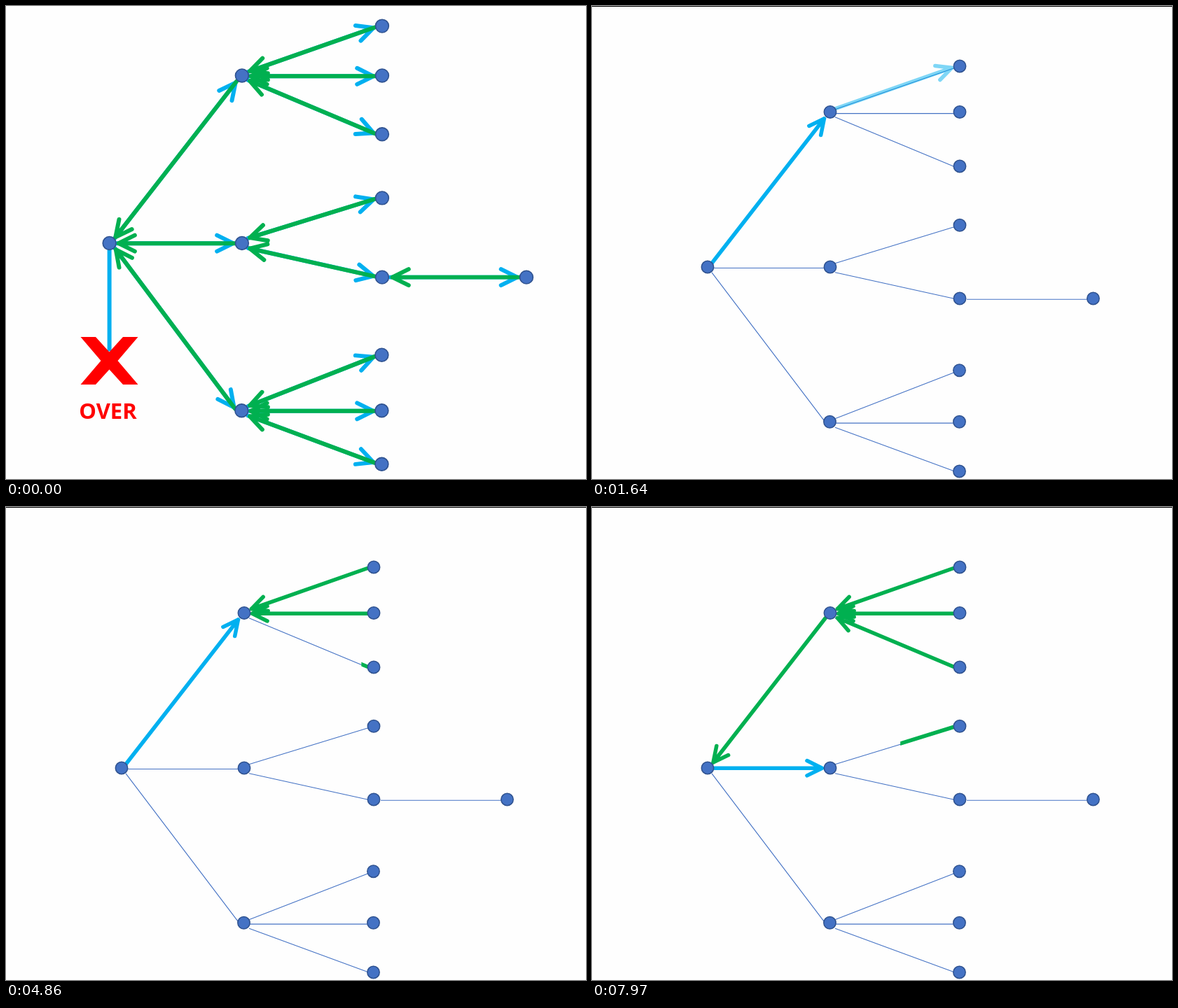
Write an HTML page with a canvas that moves like this. It is 828 px wide and 676 px high and loops after 8 s.

```html
<!DOCTYPE html>
<html lang="en">
<head>
<meta charset="utf-8">
<title>Depth-first traversal</title>
<style>
  html, body { margin: 0; width: 100%; height: 100%; overflow: hidden; background: #fefefe; }
  canvas { display: block; }
</style>
</head>
<body>
<canvas id="stage" width="828" height="676"></canvas>
<script>
const ctx = document.getElementById('stage').getContext('2d');
const LOOP = 8000, BLUE = '#00b0f0', GREEN = '#00b050', NODE = '#4472c4', RED = '#ff0000';

const nodes = [
  [165, 373], [340, 151.5], [340, 373], [339.5, 594.3],
  [525, 86], [525, 151.5], [525, 229], [525, 313.3], [525, 418],
  [524.5, 520.7], [524.5, 594.3], [524.5, 665], [715.5, 418]
];

// Ends of each edge, then the step at which it is entered and left.
const edges = [
  { line: [171.5, 367, 333, 159], enter: -2, leave: 8 },
  { line: [348, 146.5, 516, 87.5], enter: -1, leave: 0 },
  { line: [349, 152.3, 516, 152.3], enter: 2, leave: 3 },
  { line: [348, 157.5, 516, 228.3], enter: 5, leave: 6 },
  { line: [174.5, 373.2, 331, 373.2], enter: 10 },
  { line: [348, 366.5, 516, 314.5], enter: 11, leave: 12 },
  { line: [348, 379.5, 516, 417] },
  { line: [536, 418, 706, 418] },
  { line: [172, 379.5, 331, 592] },
  { line: [348, 588.5, 516, 522.5] },
  { line: [349, 594.8, 516, 594.8] },
  { line: [348, 601, 516, 663.5] }
];

const STEP = 488.7, FIRST = 1390;
const TICK = 89.2, TICK_START = 1365;
const clamp = v => Math.min(1, Math.max(0, v));

function progress(step, t) {
  if (step === undefined) return 0;
  if (step === -2) return clamp((t - 500) / 401);
  return clamp((t - FIRST - step * STEP) / STEP);
}

function strokeLine(x1, y1, x2, y2, color, width) {
  ctx.beginPath();
  ctx.moveTo(x1, y1);
  ctx.lineTo(x2, y2);
  ctx.strokeStyle = color;
  ctx.lineWidth = width;
  ctx.stroke();
}

function arrow([x1, y1, x2, y2], color, shown = 1, alpha = 1) {
  if (shown <= 0 || alpha <= 0) return;
  const angle = Math.atan2(y2 - y1, x2 - x1);
  const tipX = x2 - 2.5 * Math.cos(angle), tipY = y2 - 2.5 * Math.sin(angle);
  const arm = side => [
    tipX - 24 * Math.cos(angle + side * 0.46),
    tipY - 24 * Math.sin(angle + side * 0.46)
  ];
  ctx.save();
  if (shown < 1) {
    const dir = Math.sign(x2 - x1);
    const from = x1 - 3 * dir;
    ctx.beginPath();
    ctx.rect(from, 0, (x2 + 2 * dir - from) * shown, 676);
    ctx.clip();
  }
  ctx.globalAlpha = alpha;
  ctx.strokeStyle = color;
  ctx.lineWidth = 5.5;
  ctx.lineCap = ctx.lineJoin = 'round';
  ctx.beginPath();
  ctx.moveTo(x1, y1);
  ctx.lineTo(tipX, tipY);
  ctx.moveTo(...arm(1));
  ctx.lineTo(tipX, tipY);
  ctx.lineTo(...arm(-1));
  ctx.stroke();
  ctx.restore();
}

const back = ([x1, y1, x2, y2]) => [x2, y2, x1, y1];

function drawNodes() {
  for (const [x, y] of nodes) {
    ctx.beginPath();
    ctx.arc(x, y, 8.7, 0, 2 * Math.PI);
    ctx.fillStyle = NODE;
    ctx.fill();
    ctx.strokeStyle = '#2f528f';
    ctx.lineWidth = 1.5;
    ctx.stroke();
  }
}

function drawFinished() {
  ctx.save();
  ctx.translate(-30.8, -64.4);
  ctx.scale(1.0814, 1.0814);
  for (const e of edges) arrow(e.line, BLUE);
  for (const e of edges) arrow(back(e.line), GREEN);
  strokeLine(165, 380, 165, 516, BLUE, 5.5);
  drawNodes();
  ctx.restore();

  ctx.fillStyle = RED;
  ctx.beginPath();
  for (const [sx, sy] of [[-1, -1], [1, -1], [1, 1], [-1, 1]]) {
    const corner = [[41, 34], [19.5, 34], [0, 12.5]];
    const side = [[12, 0]];
    const points = sx === sy ? [...side, ...corner] : [...corner.reverse(), ...side];
    for (const [x, y] of points) ctx.lineTo(147.5 + sx * x, 507 + sy * y);
  }
  ctx.fill();
  ctx.font = 'bold 31px "Open Sans", "Noto Sans", sans-serif';
  ctx.textAlign = 'center';
  ctx.fillText('OVER', 145.5, 589.5);
}

function drawTraversal(t) {
  for (const { line: [x1, y1, x2, y2] } of edges) {
    strokeLine(x1 - 1, y1 + 1.3, x2 + 1, y2 + 1.3, NODE, 1.1);
  }
  for (const e of edges) {
    arrow(e.line, BLUE, progress(e.enter, t), 1 - progress(e.leave, t));
  }
  for (const e of edges) {
    if (e.leave !== undefined) arrow(back(e.line), GREEN, progress(e.leave + 1, t));
  }
  drawNodes();
  ctx.fillStyle = '#000';
  ctx.fillRect(0, 0, 828, 1);
}

function render(now) {
  const t = now % LOOP;
  ctx.fillStyle = t >= 500 && t < 560 ? '#000' : '#fefefe';
  ctx.fillRect(0, 0, 828, 676);
  if (t < 500) drawFinished();
  else if (t >= 560) {
    drawTraversal(TICK_START + Math.floor((t - TICK_START) / TICK) * TICK);
  }
}

const start = performance.now();
function frame() {
  render(performance.now() - start);
  requestAnimationFrame(frame);
}
frame();
</script>
</body>
</html>
```
